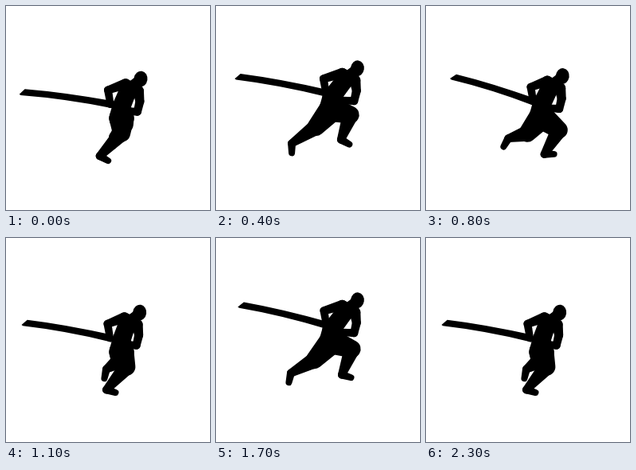
Write an HTML page with a canvas that moves like this. It is 256 px wide and 256 px high and loops after 2400 ms.

```html
<!DOCTYPE html>
<html lang="en">
<head>
<meta charset="utf-8">
<title>Running swordsman</title>
<style>
  html, body { margin: 0; width: 100%; height: 100%; overflow: hidden; background: #fff; }
  canvas { display: block; width: 256px; height: 256px; }
</style>
</head>
<body>
<canvas id="stage" width="256" height="256"></canvas>
<script>
const ctx = document.getElementById('stage').getContext('2d');
const STEP = 100;            // ms per drawing
const CYCLE = 24;            // drawings per loop: one stride of each leg
const STRIDE = CYCLE / 2;

const turn = (t, peak, period) => Math.cos(2 * Math.PI * (t - peak) / period);
// The legs swing once per loop, the body bobs once per stride.
const swing = (t, size, peak) => size * turn(t, peak, CYCLE);
const bob = (t, size, peak) => size * turn(t, peak, STRIDE);

const shift = ([x, y], dx, dy) => [x + dx, y + dy];

// Tapered capsule between two circles.
function limb([x1, y1], r1, [x2, y2], r2) {
  const len = Math.hypot(x2 - x1, y2 - y1) || 1;
  const a = Math.atan2(y2 - y1, x2 - x1);
  const b = Math.acos(Math.max(-1, Math.min(1, (r1 - r2) / len)));
  ctx.beginPath();
  ctx.arc(x1, y1, r1, a + b, a - b + 2 * Math.PI);
  ctx.arc(x2, y2, r2, a - b, a + b);
  ctx.fill();
}

function leg(t, hip) {
  const knee = [
    147 + swing(t, 24, 17.7),
    152 + swing(t, 8, 3) + bob(t, 8, 9.5)
  ];
  const ankle = [
    126 + swing(t, 32, 17),
    174 + swing(t, 13, -1.3) + bob(t, 4, 10)
  ];
  const tilt = (60 + swing(t, 60, 8)) * Math.PI / 180;
  const toe = shift(ankle, 12 * Math.cos(tilt), 12 * Math.sin(tilt));
  limb(hip, 15.5, knee, 11);
  limb(knee, 10, ankle, 5);
  limb(ankle, 5, toe, 4);
}

function sword(tip, grip) {
  const len = Math.hypot(grip[0] - tip[0], grip[1] - tip[1]);
  ctx.save();
  ctx.translate(...tip);
  ctx.rotate(Math.atan2(grip[1] - tip[1], grip[0] - tip[0]));
  ctx.beginPath();
  ctx.moveTo(-1, 3);
  ctx.lineTo(5, -4.5);
  ctx.quadraticCurveTo(len / 2, -7, len + 6, -4);
  ctx.lineTo(len + 6, 5);
  ctx.quadraticCurveTo(len / 2, 1, 1, 4);
  ctx.fill();
  ctx.restore();
}

function torso(head, hip) {
  const chest = shift(head, -16, 15), waist = shift(hip, 0, -15);
  limb(chest, 11, waist, 11.5);
  limb(waist, 11.5, hip, 15.5);
  limb(head, 6, shift(head, -9, 8), 7);
  ctx.beginPath();
  ctx.ellipse(...head, 8.5, 10, 0.15, 0, 2 * Math.PI);
  ctx.fill();
}

function arms(head, grip) {
  const back = shift(head, -19, 6), backElbow = shift(grip, 0, -17);
  limb(back, 6.5, backElbow, 5);
  limb(backElbow, 5, shift(grip, 3, 1), 4.5);

  const front = shift(head, -3, 15), frontElbow = shift(head, -1, 28);
  const wrist = shift(head, -4, 41);
  limb(back, 6.5, front, 7);
  limb(front, 7, frontElbow, 5.5);
  limb(frontElbow, 5.5, wrist, 5);
  limb(wrist, 5, shift(head, -19, 40), 4.5);
}

function draw(t) {
  const head = [172.5 + bob(t, 5, 4.5), 86 + bob(t, 8, 10.5)];
  const grip = [131.5 + bob(t, 4, 5), 116.5 + bob(t, 8.5, 10.5)];
  const tip = [25 + bob(t, 8, 7), 95 + bob(t, 13, 0)];
  const hip = [145, 136.5 + bob(t, 7, 10.3)];

  ctx.fillStyle = '#fff';
  ctx.fillRect(0, 0, 256, 256);
  ctx.fillStyle = '#000';
  sword(tip, grip);
  leg(t, hip);
  leg(t + STRIDE, hip);
  torso(head, hip);
  arms(head, grip);
}

const start = performance.now();
function tick() {
  const elapsed = Math.max(0, performance.now() - start);
  draw(Math.floor(elapsed / STEP) % CYCLE);
  requestAnimationFrame(tick);
}
tick();
</script>
</body>
</html>
```
